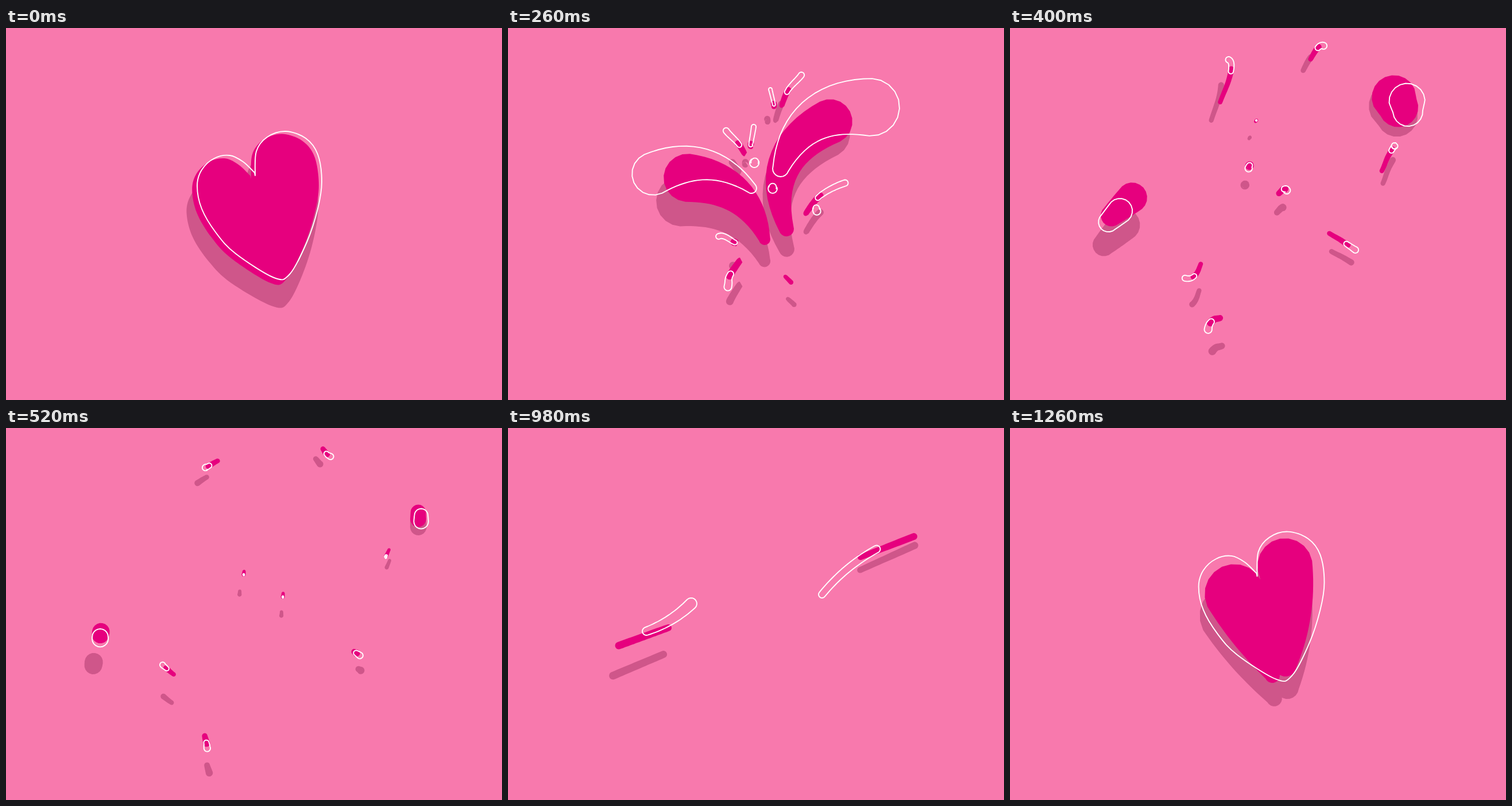
An HTML page for the animation above (1.28 s loop, 864 px wide and 648 px high).

```html
<!DOCTYPE html>
<html lang="en">
<head>
<meta charset="utf-8">
<title>Bursting heart</title>
<style>
  html, body { margin: 0; width: 100%; height: 100%; overflow: hidden; background: #f879ad; }
  svg { display: block; width: 100vw; height: 100vh; }
</style>
</head>
<body>
<svg viewBox="0 0 864 648">
  <path id="shadow" fill="#cf568a" transform="matrix(1.041 -.055 .05 1.045 -37 46)"/>
  <path id="body" fill="#e6007e"/>
  <path id="line" fill="none" stroke="#fff" stroke-width="1.9" stroke-linejoin="round"/>
</svg>
<script>
const LOOP = 1280, STEP = 20, LAG = 40; // the solid follows the line by LAG
const SPLIT = 190, JOIN = 1240;
const TRAIL = 45; // how far back in time a splash's tail reaches

const fmt = v => v.toFixed(1);
const clamp = (v, lo, hi) => Math.min(hi, Math.max(lo, v));

// Tangent rules: one never overshoots, the other swings through the points
const steady = (a, b) => a * b > 0 ? 2 * a * b / (a + b) : 0;
const swing = (a, b, ha, hb) => (a * hb + b * ha) / (ha + hb);

function curve(ts, vs, t, rule) {
  const last = vs.length - 1;
  t = clamp(t, ts[0], ts[last]);
  let i = 0;
  while (i < last - 1 && ts[i + 1] <= t) i++;
  const gap = j => ts[j + 1] - ts[j], rate = j => (vs[j + 1] - vs[j]) / gap(j);
  const slope = j => j < 1 || j >= last ? 0 : rule(rate(j - 1), rate(j), gap(j - 1), gap(j));
  const h = gap(i), s = (t - ts[i]) / h;
  return vs[i] + (vs[i + 1] - vs[i]) * s * s * (3 - 2 * s)
    + h * s * (1 - s) * ((1 - s) * slope(i) - s * slope(i + 1));
}

// Round-ended tube around a spine; point and radius are functions of s in 0..1
function tube(point, radius) {
  const N = 18, CAP = 10, Q = Math.PI / 2, left = [], right = [], caps = [[], []];
  for (let i = 0; i <= N; i++) {
    const s = i / N, [x, y] = point(s), r = radius(s);
    const [ax, ay] = point(Math.max(0, s - .03)), [bx, by] = point(Math.min(1, s + .03));
    const a = Math.atan2(by - ay, bx - ax);
    const rim = turn => fmt(x + r * Math.cos(a + turn)) + " " + fmt(y + r * Math.sin(a + turn));
    left.push(rim(-Q));
    right.unshift(rim(Q));
    if (i % N) continue;
    for (let c = 1; c < CAP; c++) caps[i / N].push(rim((i ? -Q : Q) + Math.PI * c / CAP));
  }
  return "M" + [...left, ...caps[1], ...right, ...caps[0]].join("L") + "Z";
}

// Halves: [head x, y, radius, tail x, y, radius, bend] at shared times.
// They leave from the pose in which they meet again.
const halfTimes = [160, 220, 260, 300, 340, 500, 700, 940, 980, 1220];
const half = (...poses) => [poses[poses.length - 1], ...poses];
const halves = [
  half(
    [313, 261, 42, 447, 368, 10, 29],
    [253, 254, 37, 424, 279, 9, 29],
    [192, 315, 26, 274, 256, 40, 1],
    [180, 322, 20, 224, 284, 29, 0],
    [164, 364, 14.5, 164, 360, 14.5, 0],
    [168, 388, 10.5, 169, 384, 10.5, 0],
    [193, 379, 6.5, 279, 348, 6, 0],
    [241, 354, 7, 319, 306, 10, -5],
    [391, 289, 52, 457, 431, 13, 0]
  ),
  half(
    [561, 163, 39, 485, 350, 13, -45],
    [632, 138, 50, 475, 245, 14, -37],
    [645, 130, 51, 511, 159, 12, -11],
    [668, 135, 39, 655, 120, 40, 0],
    [721, 161, 13, 721, 150, 12, 0],
    [734, 175, 11.5, 734, 169, 11, 0],
    [707, 189, 6, 614, 225, 5, 0],
    [642, 211, 6.5, 547, 290, 6, -6],
    [479, 240, 48, 480, 414, 19, 8]
  )
];

function halfPath(poses, t) {
  const [hx, hy, hr, tx, ty, tr, bend] =
    poses[0].map((_, j) => curve(halfTimes, poses.map(p => p[j]), t, steady));
  const dx = tx - hx, dy = ty - hy, len = Math.hypot(dx, dy) || 1;
  const mr = Math.sqrt((hr * hr + tr * tr) / 2);
  return tube(
    s => {
      const b = 4 * s * (1 - s) * bend / len;
      return [hx + dx * s + dy * b, hy + dy * s - dx * b];
    },
    s => hr * (1 - s) * (1 - 2 * s) + mr * 4 * s * (1 - s) + tr * s * (2 * s - 1)
  );
}

// Splashes: size, birth, end, then the way flown at shared times
const flyTimes = [180, 220, 260, 300, 340, 500, 700];
const splash = (size, birth, end, ...way) => ({
  size, birth, end,
  xs: way.filter((_, i) => i % 2 === 0),
  ys: way.filter((_, i) => i % 2)
});
const splashes = [
  splash(5, 180, 800, 477,135, 488,108, 511,82, 519,63, 532,40, 562,48, 588,67),
  splash(4, 180, 300, 463,137, 463,132, 457,107),
  splash(5.5, 180, 560, 519,323, 544,292, 587,270, 637,262, 659,223, 661,225),
  splash(5, 230, 800, 537,312, 537,314, 538,319, 546,349, 577,370, 613,394, 633,408),
  splash(4, 180, 258, 483,433, 493,443, 500,452),
  splash(6, 180, 720, 404,405, 386,432, 383,451, 372,499, 355,508, 350,554, 362,575),
  splash(4.6, 180, 800, 396,374, 394,373, 367,363, 338,400, 326,426, 275,415, 286,387),
  splash(5, 180, 800, 412,219, 401,201, 380,179, 361,150, 381,91, 349,68, 351,104),
  splash(4, 180, 420, 423,206, 423,202, 428,172, 427,165, 429,161),
  splash(5.6, 225, 540, 430,233, 430,233, 429,235, 420,240, 418,239, 414,256),
  splash(5.6, 225, 540, 461,277, 461,277, 461,280, 465,290, 475,282, 482,295)
];

function splashPath({ size, birth, end, xs, ys }, t) {
  const at = u => [curve(flyTimes, xs, u, swing), curve(flyTimes, ys, u, swing)];
  const [hx, hy] = at(t), [tx, ty] = at(t - TRAIL);
  const age = (t - birth) / (end - birth), grow = Math.min(1, (t - birth) / 30);
  // short trails gather into rounder drops
  const round = 1 + .5 * Math.exp(-Math.hypot(hx - tx, hy - ty) / 15);
  const r = size * round * grow * (1 - age ** 3);
  return tube(s => at(t - TRAIL * (1 - s)), s => r * (.8 + .2 * s));
}

// Heart contour, clockwise from the notch
const heart = [[434,257], [436,215], [455,190], [487,180], [522,192], [543,220], [550,268],
  [543,315], [524,373], [494,429], [467,435], [400,393], [366,357], [341,315], [333,275],
  [341,247], [363,227], [390,222], [413,233], [433,252]];

function heartPath(t) {
  const v = t < SPLIT ? t : t - LOOP, settle = Math.max(0, -v / 40);
  const k = 1 + .017 * settle - (v > 0 ? .04 * Math.sin(Math.PI * v / SPLIT) : 0);
  const pts = heart.map(([x, y]) => [
    437 + (x - 437) * k - 7 * settle,
    320 + (y - 320) * k + 7 * settle * settle
  ]);
  const at = i => pts[clamp(i, 0, pts.length - 1)];
  const handle = (i, sign) => [0, 1].map(c => fmt(at(i)[c] + sign * (at(i + 1)[c] - at(i - 1)[c]) / 6));
  let d = "M" + pts[0].map(fmt).join(" ");
  for (let i = 1; i < pts.length; i++)
    d += "C" + [...handle(i - 1, 1), ...handle(i, -1), ...pts[i].map(fmt)].join(" ");
  return d + "Z";
}

function shape(t) {
  t = (t + LOOP) % LOOP;
  if (t < SPLIT || t >= JOIN) return heartPath(t);
  return halves.map(h => halfPath(h, t)).join("")
    + splashes.filter(s => t > s.birth && t < s.end).map(s => splashPath(s, t)).join("");
}

const [shadow, body, line] = ["shadow", "body", "line"].map(id => document.getElementById(id));

function draw(ms) {
  let t = Math.floor(ms % LOOP / STEP) * STEP;
  if (t === 20 || t === 540) t -= STEP; // held poses
  const solid = shape(t - LAG);
  shadow.setAttribute("d", solid);
  body.setAttribute("d", solid);
  line.setAttribute("d", shape(t));
}

const begin = performance.now();
function tick() {
  draw(performance.now() - begin);
  requestAnimationFrame(tick);
}
draw(0);
requestAnimationFrame(tick);
</script>
</body>
</html>
```
